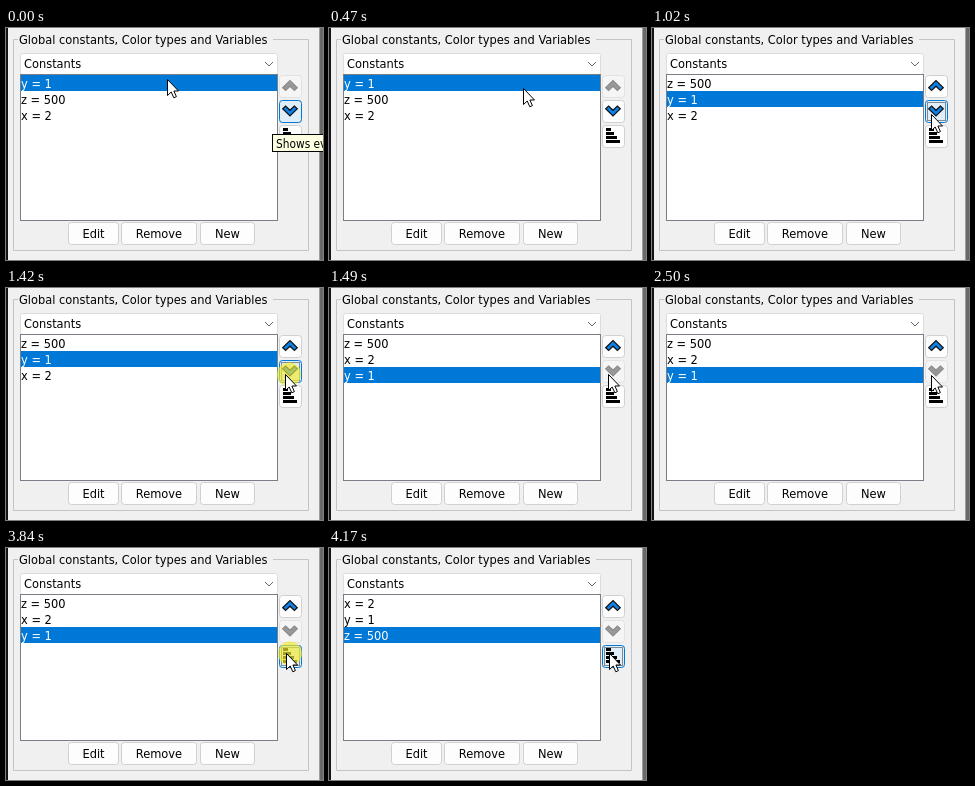
These frames come from a looping animation (317 px wide and 232 px high, 4500 ms). An HTML page:

```html
<!DOCTYPE html>
<html lang="en">
<head>
<meta charset="utf-8">
<title>Sorting constants</title>
<style>
  html, body { margin: 0; width: 100%; height: 100%; overflow: hidden; background: #f0f0f0; }
  svg { display: block; width: 317px; height: 232px; }
  text { font: 12.7px "DejaVu Sans Condensed", "Noto Sans", sans-serif; fill: #000; white-space: pre; }
  .mid { text-anchor: middle; }
  .button { fill: #fdfdfd; stroke: #d0d0d0; }
  .button.off { fill: #f5f5f5; stroke: #e2e2e2; }
  .button.hot { fill: #e0eef9; stroke: #0078d4; }
  .focus { fill: none; stroke: #222; stroke-dasharray: 1 1; }
  .chevron { fill: #0c82e8; stroke: #111; stroke-width: 1.2; }
  .chevron.off { fill: #999; stroke: #8c8c8c; }
  .tip rect { fill: #ffffe1; stroke: #000; }
  .tip text { font-size: 11.8px; }
</style>
</head>
<body>
<svg viewBox="0 0 317 232">
  <rect width="317" height="232" fill="#f0f0f0"/>
  <rect width="2" height="232" fill="#17121a"/>
  <rect x="313" width="1" height="232" fill="#a0a0a0"/>
  <rect x="314" width="3" height="232" fill="#696969"/>
  <path d="M12 11.5H7.5V222.5H302.5V11.5H267" fill="none" stroke="#c4c4c4"/>
  <text x="13" y="16">Global constants, Color types and Variables</text>

  <rect x="14.5" y="25.5" width="257" height="21" rx="2" fill="#fff" stroke="#dcdcdc"/>
  <text x="18" y="40">Constants</text>
  <path d="M259 34l4 4 4-4" fill="none" stroke="#666"/>

  <rect x="14.5" y="46.5" width="257" height="146" fill="#fff" stroke="#7a7f87"/>
  <rect id="selection" x="15" width="256" height="16" fill="#0078d7"/>
  <g id="rows"></g>
  <g id="buttons"></g>
  <g id="side"></g>

  <g class="tip" id="tipEvents">
    <rect x="266.5" y="106.5" width="70" height="17"/>
    <text x="270" y="120">Shows events</text>
  </g>
  <g class="tip" id="tipSort">
    <rect x="280.5" y="125.5" width="70" height="17"/>
    <text x="284" y="139">Sorts the list</text>
  </g>

  <circle id="halo" r="12" fill="#f2ea30" opacity=".68"/>
  <path id="cursor" d="M.5.5V16.5L4.2 13 6.8 18.8 9.4 17.6 6.9 12H11.5Z" fill="#fff" stroke="#000"/>
</svg>
<script>
const LOOP = 4500, TICK = 67.7, FADE = 270, PRESS = 68;
const $ = id => document.getElementById(id);

function add(parent, tag, attrs, text = "") {
  const el = document.createElementNS("http://www.w3.org/2000/svg", tag);
  for (const key in attrs) el.setAttribute(key, attrs[key]);
  el.textContent = text;
  parent.append(el);
  return el;
}

const box = (parent, x, y, width, height, kind = "button") =>
  add(parent, "rect", { class: kind, x: x + .5, y: y + .5, width, height, rx: 3 });

for (const [label, x, w] of [["Edit", 62, 50], ["Remove", 115, 75], ["New", 194, 54]]) {
  box($("buttons"), x, 194, w, 22);
  add($("buttons"), "text", { class: "mid", x: x + w / 2 + .5, y: 210 }, label);
}

const rows = [0, 1, 2].map(i => add($("rows"), "text", { x: 15, y: 60 + i * 16 }));

const sideButton = y => ({
  base: box($("side"), 273, y, 22, 22),
  hot: box($("side"), 273, y, 22, 22, "button hot"),
  focus: add($("side"), "rect", { class: "focus", x: 275.5, y: y + 2.5, width: 18, height: 18 })
});
const [upBtn, downBtn, sortBtn] = [47, 72, 97].map(sideButton);

const chevron = (y, flip) => add($("side"), "path", {
  d: "M-7.3 2.2L0-5 7.3 2.2 4.4 5 0 .7-4.4 5Z",
  transform: `translate(284 ${y}) scale(1 ${flip})`
});
const up = chevron(57.5, 1), down = chevron(83, -1);
[5, 8, 11, 14].forEach((width, i) =>
  add($("side"), "rect", { x: 277, y: 100 + i * 4, width, height: 3 }));

// Start time, items, selected row
const lists = [
  [0, ["y = 1", "z = 500", "x = 2"], 0],
  [1020, ["z = 500", "y = 1", "x = 2"], 1],
  [1490, ["z = 500", "x = 2", "y = 1"], 2],
  [3910, ["x = 2", "y = 1", "z = 500"], 2]
];
const clicks = [950, 1420, 3840];

const easeIn = p => p * p;
const easeOut = p => p * (2 - p);
const easeBoth = p => p * p * (3 - 2 * p);

// Time, tip of the cursor, easing towards that point
const path = [
  [0, 161, 51],
  [200, 145, 38, easeOut],
  [470, 194, 60, easeIn],
  [820, 279, 86, easeOut],
  [2440, 279, 86, easeOut],
  [2800, 280, 105, easeBoth],
  [LOOP, 280, 105, easeOut]
];

const clamp = v => Math.max(0, Math.min(1, v));
const show = (el, on) => el.setAttribute("visibility", on ? "visible" : "hidden");
const during = (t, from, to) => t >= from && t < to;
const fade = (t, from, to) => Math.min(clamp((t - from) / FADE), clamp(1 - (t - to) / FADE));

function pointer(t) {
  const i = path.findIndex(point => point[0] > t);
  const [t0, x0, y0] = path[i - 1], [t1, x1, y1, ease] = path[i];
  const e = ease((t - t0) / (t1 - t0));
  return [Math.round(x0 + (x1 - x0) * e), Math.round(y0 + (y1 - y0) * e)];
}

function paint(btn, off, hover, focused) {
  btn.base.setAttribute("class", off ? "button off" : "button");
  btn.hot.setAttribute("opacity", off ? 0 : hover);
  show(btn.focus, focused);
}

function draw(t) {
  const [, items, picked] = lists.findLast(list => list[0] <= t);
  rows.forEach((row, i) => {
    row.textContent = items[i];
    row.style.fill = i === picked ? "#fff" : "#000";
  });
  $("selection").setAttribute("y", 47 + picked * 16);

  const now = Math.max(0, Math.floor((t + 8) / TICK) * TICK - 4);
  const upOff = picked === 0, downOff = picked === 2;
  paint(upBtn, upOff, 0, false);
  paint(downBtn, downOff, Math.max(fade(now, -FADE, 0), fade(now, 740, LOOP)), during(t, 950, 1490));
  paint(sortBtn, false, fade(now, 2630, LOOP), t >= 3840);
  up.setAttribute("class", upOff ? "chevron off" : "chevron");
  down.setAttribute("class", downOff ? "chevron off" : "chevron");

  show($("tipEvents"), t < 60);
  show($("tipSort"), during(t, 3240, 3840));

  const [x, y] = pointer(now);
  $("cursor").setAttribute("transform", `translate(${x} ${y})`);
  show($("halo"), clicks.some(start => during(t, start, start + PRESS)));
  $("halo").setAttribute("cx", x + 4);
  $("halo").setAttribute("cy", y + .5);
}

const start = performance.now();
function tick() {
  draw((performance.now() - start) % LOOP);
  requestAnimationFrame(tick);
}
tick();
</script>
</body>
</html>
```
